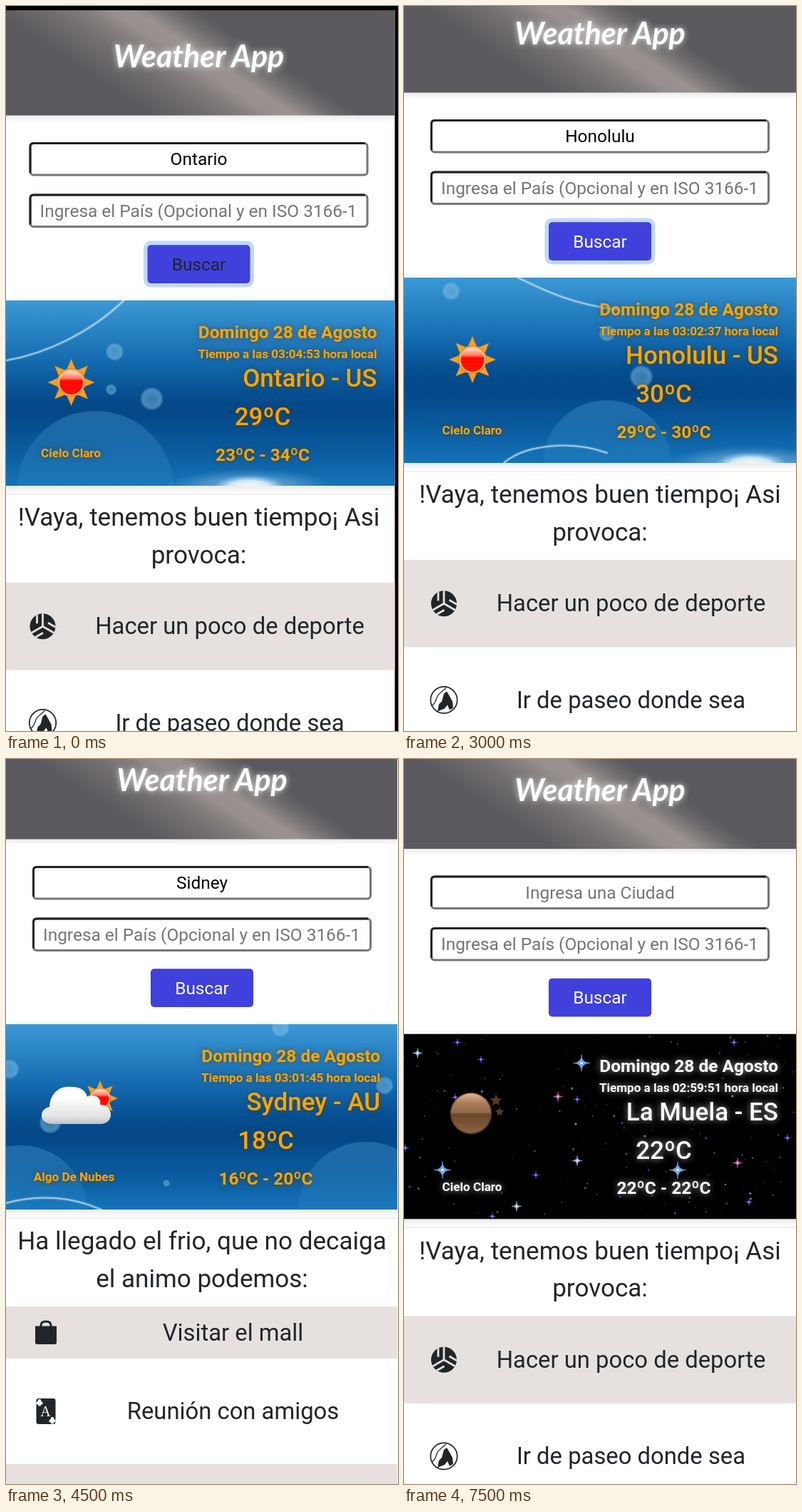
Animation of 550x1017 px, one loop 9000 ms. Source, as an HTML page:

```html
<!DOCTYPE html>
<html lang="es">
<head>
<meta charset="utf-8">
<title>Weather App</title>
<style>
html, body { margin: 0; width: 100%; height: 100%; overflow: hidden; background: #fff; }
#stage { position: absolute; left: 0; top: 0; width: 100%; height: 100%; overflow: hidden; contain: paint; }
#strip { animation: cut 9s steps(6) infinite; }
@keyframes cut { to { transform: translateX(-3300px); } }
text { font-family: Roboto, sans-serif; font-size: 24.44px; fill: #212529; }
.mid { text-anchor: middle; }
.end { text-anchor: end; }
.title { font: italic 700 43px Lato, sans-serif; fill: #fff; filter: drop-shadow(0 0 4px rgba(255,255,255,.75)); }
.hint { fill: #757575; }
.value { fill: #000; }
.head { font-size: 35.1px; }
.item { font-size: 32.8px; }
.day text { fill: #ffa500; }
.day { filter: drop-shadow(0 0 4px rgba(70,55,20,.75)); }
.night text { fill: #fff; }
.night { filter: drop-shadow(0 0 5px rgba(255,255,255,.6)); }
.bold { font-weight: 700; }
.small { font-weight: 700; font-size: 17.1px; }
.big { font-weight: 500; font-size: 35px; }
.ace { font: 20px "Liberation Serif", serif; fill: #fff; }
</style>
</head>
<body>
<svg id="stage" viewBox="0 0 550 1017" xmlns="http://www.w3.org/2000/svg">
<defs>
  <linearGradient id="beam" gradientUnits="userSpaceOnUse" x1="159.6" y1="251.4" x2="390.4" y2="-103.9">
    <stop offset=".27" stop-color="#5b595e"/><stop offset=".38" stop-color="#726e70"/>
    <stop offset=".44" stop-color="#847e7d"/><stop offset=".485" stop-color="#979090"/>
    <stop offset=".53" stop-color="#999290"/><stop offset=".565" stop-color="#827d7d"/>
    <stop offset=".6" stop-color="#6c696c"/><stop offset=".645" stop-color="#5b595e"/>
  </linearGradient>
  <linearGradient id="sky" x2="0" y2="1">
    <stop offset="0" stop-color="#3b98d5"/><stop offset=".2" stop-color="#237dbf"/>
    <stop offset=".35" stop-color="#1267ac"/><stop offset=".5" stop-color="#064f91"/>
    <stop offset=".6" stop-color="#034786"/><stop offset=".8" stop-color="#0a5a9f"/>
    <stop offset="1" stop-color="#1573b7"/>
  </linearGradient>
  <linearGradient id="hill" x2="0" y2="1">
    <stop offset="0" stop-color="#5fb4e4" stop-opacity=".3"/><stop offset=".5" stop-color="#4aa8e0" stop-opacity=".1"/>
  </linearGradient>
  <radialGradient id="bubble">
    <stop offset="0" stop-color="#8cc8ea" stop-opacity=".35"/><stop offset=".75" stop-color="#8cc8ea" stop-opacity=".5"/>
    <stop offset="1" stop-color="#8cc8ea" stop-opacity="0"/>
  </radialGradient>
  <radialGradient id="glow">
    <stop offset="0" stop-color="#fff"/><stop offset=".55" stop-color="#e8f6ff" stop-opacity=".85"/>
    <stop offset="1" stop-color="#9bd4f5" stop-opacity="0"/>
  </radialGradient>
  <linearGradient id="shade" x2="0" y2="1">
    <stop offset="0" stop-opacity=".08"/><stop offset="1" stop-opacity="0"/>
  </linearGradient>
  <linearGradient id="core" x2="0" y2="1">
    <stop offset="0" stop-color="#ffe0d0"/><stop offset=".3" stop-color="#ff7a60"/>
    <stop offset=".42" stop-color="#ff0a00"/><stop offset="1" stop-color="#f81000"/>
  </linearGradient>
  <linearGradient id="planet" x2="0" y2="1">
    <stop offset="0" stop-color="#e0b592"/><stop offset=".25" stop-color="#a87c5a"/>
    <stop offset=".48" stop-color="#91684a"/><stop offset=".52" stop-color="#6b4729"/>
    <stop offset="1" stop-color="#8a6240"/>
  </linearGradient>
  <linearGradient id="white" x2="0" y2="1">
    <stop offset=".3" stop-color="#fff"/><stop offset=".8" stop-color="#e2e2e2"/><stop offset="1" stop-color="#bfc3c6"/>
  </linearGradient>
  <linearGradient id="dark" x2="0" y2="1">
    <stop offset="0" stop-color="#666"/><stop offset=".6" stop-color="#3a3a3c"/><stop offset="1" stop-color="#222"/>
  </linearGradient>
  <clipPath id="heroClip"><path d="M0 0H550V260H0Z"/></clipPath>
  <clipPath id="fieldClip"><path d="M50 221H498V270H50Z"/></clipPath>
  <clipPath id="ballClip"><circle r="18"/></clipPath>
  <path id="cloud" d="M16 54C-4 54-5 33 11 30C12 10 26 0 42 2C56 2 62 8 64 16C78 10 84 20 82 27C101 26 103 54 82 54Z"/>
</defs>
<g id="strip"></g>
</svg>
<script>
const INK = '#212529';
const text = (x, y, cls, s) => `<text x="${x}" y="${y}" class="${cls}">${s}</text>`;
const rect = (x, y, w, h, fill, more = '') =>
  `<rect x="${x}" y="${y}" width="${w}" height="${h}" fill="${fill}" ${more}/>`;
const disc = (x, y, r, fill, more = '') => `<circle cx="${x}" cy="${y}" r="${r}" fill="${fill}" ${more}/>`;
const path = (d, fill, more = '') => `<path d="${d}" fill="${fill}" ${more}/>`;
const at = (x, y, s, scale = 1) => `<g transform="translate(${x} ${y}) scale(${scale})">${s}</g>`;

function burst(points, outer, inner) {
  let d = '';
  for (let i = 0; i < points * 2; i++) {
    const a = i * Math.PI / points - Math.PI / 2, r = i % 2 ? inner : outer;
    d += `${i ? 'L' : 'M'}${(r * Math.cos(a)).toFixed(1)} ${(r * Math.sin(a)).toFixed(1)}`;
  }
  return d + 'Z';
}

// Weather symbols
const sun = path(burst(8, 33, 18), '#f2a02a', 'stroke="#a8741c" stroke-opacity=".4"') +
  disc(0, 0, 20, '#ee8a20') + disc(0, 0, 18, '#ffc890') + disc(0, .5, 16.5, 'url(#core)');
const moon = disc(0, 0, 29.5, '#4a2f1a') + disc(0, 0, 28, 'url(#planet)') +
  at(35, -18, path(burst(5, 8.5, 4), '#5a3a20')) + at(40, -2, path(burst(5, 6.5, 3), '#5a3a20'));
const cloud = fill => `<use href="#cloud" fill="url(#${fill})"/>`;
const symbols = {
  sun: at(96, 115, sun),
  moon: at(94, 111.5, moon),
  mixed: at(132, 104, sun, .76) + at(50, 86, cloud('white')),
  clouds: at(97, 83.5, cloud('dark'), .63) + at(39, 88, cloud('white'), .98)
};

// List icons, centred on 0,0
const turn = [0, 120, 240].map(a =>
  `<path transform="rotate(${a})" d="M0 0V-20M-8-20V-4"/>`).join('');
const club = disc(0, -2.2, 2.3, '#fff') + disc(-2.3, 1, 2.3, '#fff') + disc(2.3, 1, 2.3, '#fff') +
  path('M-1 0H1L2 5H-2Z', '#fff');
const icons = {
  ball: disc(0, 0, 18, INK) +
    `<g clip-path="url(#ballClip)" stroke="#e6e1df" stroke-width="2.8" fill="none">${turn}</g>`,
  trail: disc(0, 0, 18.7, '#fff', `stroke="${INK}" stroke-width="1.7"`) +
    path('M-17 8C-10 5-12-6-5-10L3-17', 'none', `stroke="${INK}" stroke-width="1.3"`) +
    path('M-9 16L-7 6L-3 2L0-9L4-12L7-7L12 2L13 11L8 14L5 7L1 12Z', INK),
  fire: path('M-13-19H13L19-10V-8H-19V-10Z', INK) + rect(-19, 13, 38, 5.5, INK) +
    path('M-16-6V12M16-6V12', 'none', `stroke="${INK}" stroke-width="5" stroke-dasharray="4 1.5"`) +
    path('M-11-5H11', 'none', `stroke="${INK}" stroke-width="2"`) +
    path('M-10 11Q-12 3-7-1Q-6 3-4 4Q-4-2 1-4Q0 1 4 4Q6 2 6-1Q12 5 9 11H5Q7 7 2 3Q2 7-1 8Q-3 6-3 5Q-6 8-4 11Z', INK),
  card: rect(-13.5, -18, 27, 36, INK, 'rx="3"') + at(-9, -12.5, club) + at(9, 12.5, club) +
    text(-.5, 7, 'ace mid', 'A'),
  bag: path('M-15-9H15V14Q15 16.5 12 16.5H-12Q-15 16.5-15 14Z', INK) +
    path('M-7-6V-10Q-7-15.5 0-15.5T7-10V-6', 'none', `stroke="${INK}" stroke-width="3"`)
};

// Night backdrop
let seed = 7;
const rand = () => (seed = seed * 16807 % 2147483647) / 2147483647;
const flare = (x, y, r, color) =>
  disc(x, y, r * .36, color, 'opacity=".45"') +
  path(`M${x - r} ${y}Q${x} ${y} ${x} ${y - r}Q${x} ${y} ${x + r} ${y}Q${x} ${y} ${x} ${y + r}Q${x} ${y} ${x - r} ${y}Z`,
    color, `stroke="${color}" stroke-width=".6"`) + disc(x, y, r * .15, '#fff');
const flares = [
  ['#6fa8f0', 12, [249, 41, 384, 191, 54, 191]],
  ['#8fb8e0', 7, [243, 178, 158, 242, 19, 27]],
  ['#b455a8', 7, [216, 88, 468, 181]],
  ['#5a48d8', 5, [108, 36, 75, 12, 243, 92, 463, 12, 185, 198, 2, 160, 484, 236, 124, 256, 538, 146, 72, 89]]
];
function nightSky() {
  let s = rect(0, 0, 550, 260, '#000');
  const tints = ['#4a3f8c', '#6a5cc0', '#74506a', '#555a70', '#8a8fb0'];
  for (let i = 0; i < 230; i++) {
    s += disc((rand() * 550).toFixed(1), (rand() * 260).toFixed(1), (.5 + rand() ** 3 * 1.3).toFixed(1),
      tints[i % 5], `opacity="${(.5 + rand() * .5).toFixed(2)}"`);
  }
  for (const [color, r, p] of flares)
    for (let i = 0; i < p.length; i += 2) s += flare(p[i], p[i + 1], r, color);
  return s;
}
const night = nightSky();

// Day backdrop: soft hills, bubbles, glowing lines
function daySky({ hills, bubbles, lines, glow }) {
  return rect(0, 0, 550, 260, 'url(#sky)') +
    hills.map(([x, y, r]) => disc(x, y, r, 'url(#hill)')).join('') +
    `<ellipse cx="${glow}" cy="262" rx="120" ry="26" fill="url(#glow)" opacity=".3"/>` +
    `<ellipse cx="${glow}" cy="262" rx="52" ry="17" fill="url(#glow)"/>` +
    lines.map(d => path(d, 'none', 'stroke="#bfe2f6" stroke-width="5" opacity=".18"') +
      path(d, 'none', 'stroke="#d8eefa" stroke-width="2" opacity=".65" stroke-linecap="round"')).join('') +
    bubbles.map(([x, y, r]) => disc(x, y, r + 1, 'url(#bubble)')).join('');
}

const good = {
  head: ['!Vaya, tenemos buen tiempo¡ Asi', 'provoca:'],
  items: [['ball', 122.5, 'Hacer un poco de deporte'], ['trail', 148, 'Ir de paseo donde sea']]
};
const cold = {
  head: ['Las temperaturas han bajado', 'bastante, pero aun podemos', 'pasarla bien'],
  items: [['fire', 122, 'A veces solo provoca', 'quedarse en casa'], ['card', 148, 'Quedemos con amigos']]
};
const cool = {
  head: ['Ha llegado el frio, que no decaiga', 'el animo podemos:'],
  items: [['bag', 73, 'Visitar el mall'], ['card', 148, 'Reunión con amigos'], ['', 73, '']]
};

const pages = [
  { dx: -4.5, dy: 42, typed: 'Ontario', ring: 1, dim: 1, time: '03:04:53', place: 'Ontario - US', now: '29', range: [23, 34],
    sky: 'Cielo Claro', icon: 'sun', plan: good,
    day: { hills: [[130, 265, 110]], bubbles: [[157, 72, 12], [152, 125, 7], [209, 138, 16]],
      lines: ['M0 85C60 76 125 44 172 -2'], glow: 346 } },
  { dx: 0, dy: 0, edge: '#000', time: '03:03:22', place: 'Patagonia - AR', now: '6', range: [6, 6],
    sky: 'Cielo Claro', icon: 'moon', plan: cold },
  { dx: 0, dy: 10, typed: 'Honolulu', ring: 1, time: '03:02:37', place: 'Honolulu - US', now: '30', range: [29, 30],
    sky: 'Cielo Claro', icon: 'sun', plan: good,
    day: { hills: [[285, 262, 90]], bubbles: [[66, 19, 12], [285, 78, 11], [333, 139, 16]],
      lines: ['M160 0C200 20 240 38 300 45', 'M140 260C170 234 235 228 285 246'], glow: 487 } },
  { dx: 0, dy: 1, edge: '#fff', typed: 'Sidney', time: '03:01:45', place: 'Sydney - AU', now: '18', range: [16, 20],
    sky: 'Algo De Nubes', icon: 'mixed', plan: cool,
    day: { hills: [[20, 265, 95], [505, 260, 95]], bubbles: [[385, 5, 12], [5, 63, 13], [62, 138, 15], [531, 86, 12], [225, 223, 4]],
      lines: ['M0 251C45 238 95 242 135 261'], glow: 720 } },
  { dx: 0, dy: -1.5, edge: '#fff', typed: 'Alaska', ring: 1, dim: 1, time: '03:00:39', place: 'Alaska - US', now: '11', range: [11, 11],
    sky: 'Nubes', icon: 'clouds', plan: cold,
    day: { hills: [[400, 285, 105], [115, 265, 52]], bubbles: [[189, 13, 13], [424, 143, 16], [480, 135, 8], [382, 72, 10]],
      lines: ['M160 53C230 72 300 60 355 -1', 'M350 240C425 258 495 250 550 228'], glow: 720 } },
  { dx: 0, dy: 14.5, time: '02:59:51', place: 'La Muela - ES', now: '22', range: [22, 22],
    sky: 'Cielo Claro', icon: 'moon', plan: good }
];

const field = y => rect(38.5, y + 1.5, 473, 44.5, '#fff', 'rx="4.5" stroke="#76767a" stroke-width="3"') +
  path(`M38.5 ${y + 43}V${y + 6}Q38.5 ${y + 1.5} 43 ${y + 1.5}H508`, 'none', 'stroke="#212226" stroke-width="3"');

function form(p) {
  return field(149) + text(275, 181, p.typed ? 'mid value' : 'mid hint', p.typed || 'Ingresa una Ciudad') +
    field(221.5) +
    `<g clip-path="url(#fieldClip)">${text(52, 253.5, 'hint', 'Ingresa el País (Opcional y en ISO 3166-1)')}</g>` +
    (p.ring ? rect(197.5, 287.5, 155, 65, '#c2d8fb', 'rx="10"') : '') +
    rect(203, 293.3, 144, 53.7, '#4040dd', 'rx="5"') +
    `<text x="275" y="328.5" class="mid" style="fill:${p.dim ? INK : '#fff'}">Buscar</text>`;
}

function hero(p) {
  return rect(0, 366, 550, 5.5, '#000', 'opacity=".025"') +
    rect(0, 631, 550, 11, 'url(#shade)') + rect(0, 642, 550, 1.5, '#ececec') +
    at(0, 371, `<g clip-path="url(#heroClip)">${p.day ? daySky(p.day) : night}${symbols[p.icon]}</g>`) +
    `<g class="${p.day ? 'day' : 'night'}">` +
    text(525, 424.3, 'end bold', 'Domingo 28 de Agosto') +
    text(525, 452, 'end small', `Tiempo a las ${p.time} hora local`) +
    text(525, 492.3, 'end big', p.place) +
    text(364.5, 546.3, 'mid big', p.now + 'ºC') +
    text(364.5, 595.5, 'mid bold', `${p.range[0]}ºC - ${p.range[1]}ºC`) +
    text(95.5, 591, 'mid small', p.sky) + '</g>';
}

function plan({ head, items }) {
  let s = head.map((line, i) => text(275, 687.2 + i * 52.6, 'mid head', line)).join('');
  let y = 767 + (head.length - 2) * 53;
  items.forEach(([icon, h, ...lines], i) => {
    const c = y + h / 2;
    if (i % 2 === 0) s += rect(0, y, 550, h, '#e6e1df');
    if (icon) s += at(56, c, icons[icon]);
    s += lines.length > 1
      ? lines.map((l, k) => text(100, c - 13 + k * 49, 'item', l)).join('')
      : text(318.5, c + 11, 'mid item', lines[0]);
    y += h;
  });
  return s;
}

const page = (p, i) => `<svg x="${i * 550}" width="550" height="1017">` +
  rect(0, 0, 550, 1017, '#000') +
  at(p.dx, p.dy,
    rect(0, -36, 550, 1100, '#fff') + rect(0, 111, 550, 10, 'url(#shade)') +
    at(0, -36, rect(0, 0, 550, 147.5, 'url(#beam)')) +
    text(275, 44, 'mid title', 'Weather App') + form(p) + hero(p) + plan(p.plan)) +
  (p.edge ? rect(549, 0, 1, 1017, p.edge) : '') + '</svg>';

document.getElementById('strip').innerHTML = pages.map(page).join('');
</script>
</body>
</html>
```
